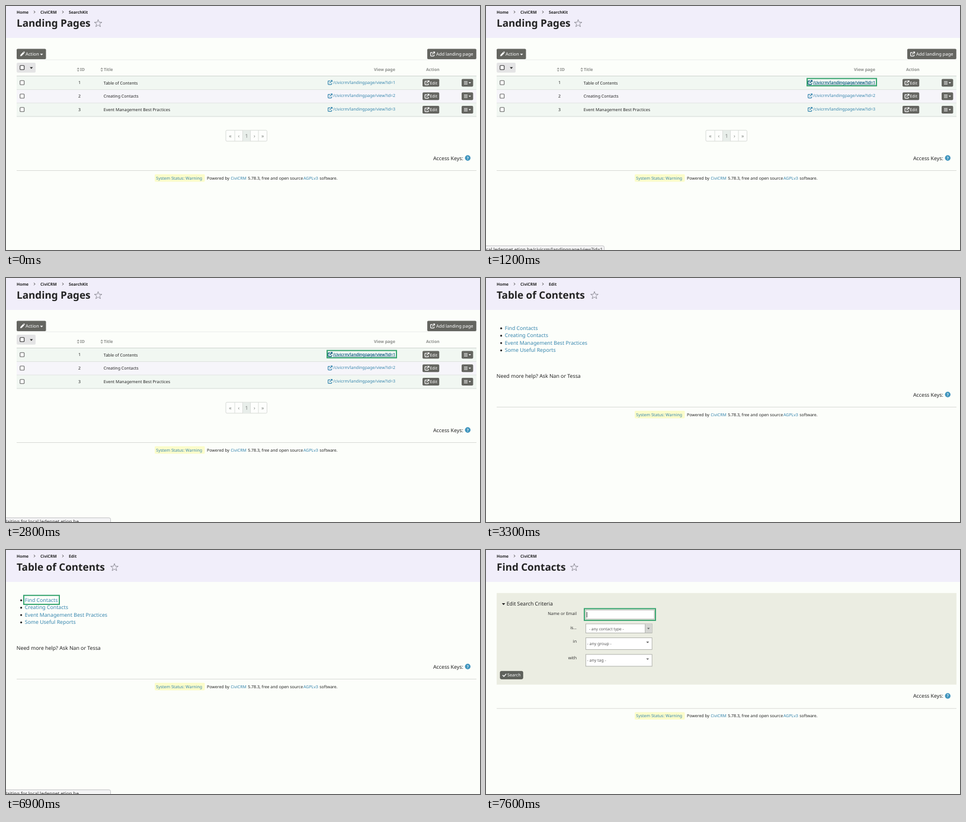
An HTML page for the animation above (8 s loop, 800 by 413 pixels).

```html
<!DOCTYPE html>
<html lang="en">
<head>
<meta charset="utf-8">
<title>Landing Pages</title>
<style>
  html, body { margin: 0; width: 100%; height: 100%; overflow: hidden; background: #fcfefa; }
  svg { display: block; width: 100%; height: 100%; }
  text { font-family: "Noto Sans", "Open Sans", sans-serif; text-rendering: geometricPrecision; white-space: pre; }
</style>
</head>
<body>
<svg id="stage" viewBox="0 0 800 413"></svg>
<script>
const LOOP = 8000;
const INK = '#232323', LINK = '#3786ae', BUTTON = '#646560', FOCUS = '#36a46f';
const HOST = 'local.ledennet.etion.be';
const stage = document.getElementById('stage');

const rect = (x, y, w, h, fill, more = '') =>
  `<rect x="${x}" y="${y}" width="${w}" height="${h}" fill="${fill}" ${more}/>`;
const text = (x, y, size, str, fill = INK, more = '') =>
  `<text x="${x}" y="${y}" font-size="${size}" fill="${fill}" ${more}>${str}</text>`;
const path = (d, fill, more = '') => `<path d="${d}" fill="${fill}" ${more}/>`;
const hline = (y, color, x = 18, w = 776) => rect(x, y, w, 1, color);
const caret = (x, y, fill, w = 5) => path(`M${x} ${y}h${w}l${-w / 2} ${w * 0.56}z`, fill);
const BOLD = 'font-weight="700"', END = 'text-anchor="end"', MID = 'text-anchor="middle"';

const button = (x, y, w, h) => rect(x, y, w, h, BUTTON, 'rx="1.8"');
const focusRing = (x, y, w, h) => rect(x, y, w, h, 'none', `stroke="${FOCUS}" stroke-width="1.9"`);
const checkbox = (x, y, color = '#666') =>
  rect(x, y, 7, 7, '#fff', `rx="1" stroke="${color}" stroke-width="1.1"`);

function openIcon(x, y, color) {
  return path('M4 1.4H1.5Q.6 1.4 .6 2.3V6.6Q.6 7.4 1.5 7.4H5.8Q6.6 7.4 6.6 6.6V5M3.2 4.9L7 1.1M4.9 .6H7.5V3.2',
    'none', `stroke="${color}" stroke-width="1.15" transform="translate(${x} ${y})"`);
}

function star(cx, cy) {
  const pts = Array.from({ length: 10 }, (_, i) => {
    const r = i % 2 ? 2.7 : 6.7, a = i * Math.PI / 5 - Math.PI / 2;
    return (cx + r * Math.cos(a)).toFixed(2) + ',' + (cy + r * Math.sin(a)).toFixed(2);
  });
  return `<polygon points="${pts.join(' ')}" fill="none" stroke="#888790" stroke-width=".9" stroke-linejoin="round"/>`;
}

function header(title, starX, crumbs) {
  const xs = [18, 58, 106];
  return rect(0, 0, 800, 54, '#f1eefa') +
    crumbs.map((c, i) => text(xs[i], 12.6, 6.8, c, INK, BOLD) +
      (i ? path(`M${xs[i] - 11} 8.2l2 2-2 2`, 'none', 'stroke="#333" stroke-width=".9"') : '')).join('') +
    text(18, 35.2, 17.15, title, INK, BOLD) + star(starX, 29.6);
}

function footer(y) {
  const base = y + 15;
  return text(721, y - 18, 8.75, 'Access Keys:') +
    `<circle cx="779.3" cy="${y - 21.2}" r="4.7" fill="#3f95bd"/>` +
    text(779.3, y - 18.9, 6.6, '?', '#fff', BOLD + ' ' + MID) +
    hline(y - 0.5, '#d9dbd6') +
    rect(251, y + 6.3, 84.5, 12.6, '#fbfcca', 'rx="1.5"') +
    text(253.3, base, 7, 'System Status: Warning', LINK) +
    text(339, base, 6.97, 'Powered by') + text(379.2, base, 6.97, 'CiviCRM', LINK) +
    text(408.2, base, 6.97, '5.78.3, free and open source') +
    text(502, base, 6.97, 'AGPLv3', LINK) + text(529.2, base, 6.97, 'software.');
}

function tableRow(title, i) {
  const y = 119 + i * 22.75, base = y + 13.6, mid = y + 11;
  const url = `/civicrm/landingpage/view?id=${i + 1}`;
  const bars = [-2.2, 0, 2.2].map(d => rect(773, mid + d - 0.4, 6, 0.9, '#fff')).join('');
  return rect(18, y, 776, 22.75, i % 2 ? '#f6f5fa' : '#f1f7f2') + hline(y + 22, '#d5dad7') +
    checkbox(23.7, y + 7.3) +
    text(124, base - 0.4, 7.05, i + 1, INK, MID) + text(164.8, base, 7.05, title) +
    openIcon(543, mid - 4.6, LINK) + text(552, base - 1, 7.05, url, LINK) +
    button(703, mid - 6.6, 28.2, 13.2) + openIcon(706.5, mid - 4, '#fff') +
    text(715.4, mid + 2.7, 7, 'Edit', '#fff') +
    button(769, mid - 6.6, 19.4, 13.2) + bars + caret(780.8, mid - 1, '#fff', 4);
}

function sortHead(x, label) {
  return path(`M${x} 107h4.6l-2.3-2.9zM${x} 108.4h4.6l-2.3 2.9z`, '#a5a7a3') +
    text(x + 5.6, 110.1, 7.05, label, '#8c8e8b', BOLD);
}

function pager() {
  const edges = [371, 386, 399.5, 412.5, 426, 440.5];
  return rect(371, 210.3, 69.5, 18.6, '#fdfefc', 'rx="2" stroke="#d8dbd7"') +
    rect(399.5, 210.8, 13, 17.6, '#e8eeea') +
    ['«', '‹', '1', '›', '»'].map((s, i) =>
      (i ? rect(edges[i] - 0.4, 210.3, 0.9, 18.6, '#d8dbd7') : '') +
      text((edges[i] + edges[i + 1]) / 2, 222.8, 8.75, s, '#7d807d', MID)).join('');
}

const pencil = path('M24 84.9l.5-2.5 4.4-4.4 2 2-4.4 4.4zM29.4 77.5l.9-.8 1.8 1.8-.8.9z', '#fff');

const landing = header('Landing Pages', 155.5, ['Home', 'CiviCRM', 'SearchKit']) +
  button(18, 72.5, 49.5, 17.5) + pencil + text(33, 84.2, 7.7, 'Action', '#fff') + caret(57.5, 80.8, '#fff') +
  button(711, 72.5, 82.8, 17.5) + openIcon(716, 77.2, '#fff') + text(726, 84.2, 7.55, 'Add landing page', '#fff') +
  hline(90.5, '#eceeeb') +
  rect(18, 96, 32, 16.8, '#e4e4e5', 'rx="2"') + checkbox(23.7, 100.7, '#333') + caret(40.3, 103.6, '#222') +
  sortHead(119.5, 'ID') + sortHead(159.3, 'Title') +
  text(657, 110.1, 7.05, 'View page', '#8c8e8b', BOLD + ' ' + END) +
  text(709, 110.1, 7.05, 'Action', '#8c8e8b', BOLD) +
  hline(118, '#cfd4d1') +
  ['Table of Contents', 'Creating Contacts', 'Event Management Best Practices'].map(tableRow).join('') +
  pager() + footer(278.5);

const landingFocus = focusRing(542, 122.7, 117, 12.4) + openIcon(543, 125.4, '#1f607f') +
  text(552, 131.6, 7.05, '/civicrm/landingpage/view?id=1', '#1f607f', 'text-decoration="underline"');

const contents = header('Table of Contents', 183, ['Home', 'CiviCRM', 'Edit']) +
  ['Find Contacts', 'Creating Contacts', 'Event Management Best Practices', 'Some Useful Reports'].map((s, i) => {
    const y = 87.8 + i * 12.45;
    return `<circle cx="25.6" cy="${y - 2.6}" r="1.6" fill="${INK}"/>` + text(31.7, y, 8.75, s, LINK);
  }).join('') +
  text(17.8, 168.5, 8.75, 'Need more help? Ask Nan or Tessa') + footer(218.5);

const contentsFocus = focusRing(30, 76.8, 60, 15.2);

const inputBox = (y, h) => rect(168.4, y, 111.8, h, '#fff', 'stroke="#abada7" stroke-width=".9"');

const search = header('Find Contacts', 149, ['Home', 'CiviCRM']) +
  rect(18, 72.8, 776, 155, '#ebede2') +
  caret(26.8, 90, INK, 5.6) + text(34.7, 94.2, 8.75, 'Edit Search Criteria') +
  [['Name or Email', 110], ['is...', 133.6], ['in', 157.2], ['with', 185.4]]
    .map(([s, y]) => text(153, y, 7.05, s, '#333', END)).join('') +
  rect(168.4, 101.8, 115.6, 15, '#fff', 'stroke="#a8aaa5" stroke-width=".8"') +
  focusRing(166, 99.3, 120, 19.8) + rect(169.8, 105, 0.9, 9.2, '#222') +
  inputBox(125, 15.4) + rect(268.6, 125.4, 11.2, 14.6, '#d5d6d3') + rect(268.2, 125.4, 0.8, 14.6, '#abada7') +
  caret(272, 131.8, '#666', 4.4) + text(174, 135.6, 6.6, '- any contact type -', '#555') +
  inputBox(148.6, 19.8) + caret(270.4, 155, '#666', 4.8) + text(170.6, 160.9, 6.9, '- any group -', '#555') +
  inputBox(176.8, 20) + caret(270.4, 183.4, '#666', 4.8) + text(170.6, 189.2, 6.9, '- any tag -', '#555') +
  rect(24, 205.3, 38.2, 13, '#5f625c', 'rx="1.8" stroke="#444641" stroke-width=".8"') +
  path('M28 211.8l2.2 2.2 4-4.4', 'none', 'stroke="#fff" stroke-width="1.4"') +
  text(36, 214.4, 7.15, 'Search', '#fff') + footer(268.2);

const statusBar = (width, textEnd, str) =>
  rect(-6, 405.9, width + 6, 20, '#f4f4f5', 'rx="2.5" stroke="#bdbdbf" stroke-width=".9"') +
  text(textEnd, 414.9, 7.96, str, '#333', END);

const handshake = statusBar(176.5, 166, 'Performing a TLS handshake to ' + HOST);
const waiting = statusBar(176.5, 123, 'Waiting for ' + HOST);

// Each scene starts at its time in ms and holds until the next one.
const scenes = [
  [0, landing],
  [100, landing + landingFocus + statusBar(199.5, 197, HOST + '/civicrm/landingpage/view?id=1')],
  [1900, landing + landingFocus + handshake],
  [2400, landing + landingFocus + waiting],
  [2900, contents],
  [5300, contents + contentsFocus + statusBar(200, 197.5, HOST + '/civicrm/contact/search?reset=1')],
  [5900, contents + contentsFocus + handshake],
  [6700, contents + contentsFocus + waiting],
  [7000, search]
];

stage.innerHTML = rect(0, 0, 800, 413, '#fcfefa') + scenes.map(s => `<g display="none">${s[1]}</g>`).join('');
const groups = stage.querySelectorAll('g');
let shown = -1;

function draw(ms) {
  const now = scenes.findLastIndex(s => s[0] <= ms);
  if (now === shown) return;
  groups.forEach((g, i) => g.setAttribute('display', i === now ? 'inline' : 'none'));
  shown = now;
}

const start = performance.now();
function tick() {
  draw((performance.now() - start) % LOOP);
  requestAnimationFrame(tick);
}
tick();
</script>
</body>
</html>
```
